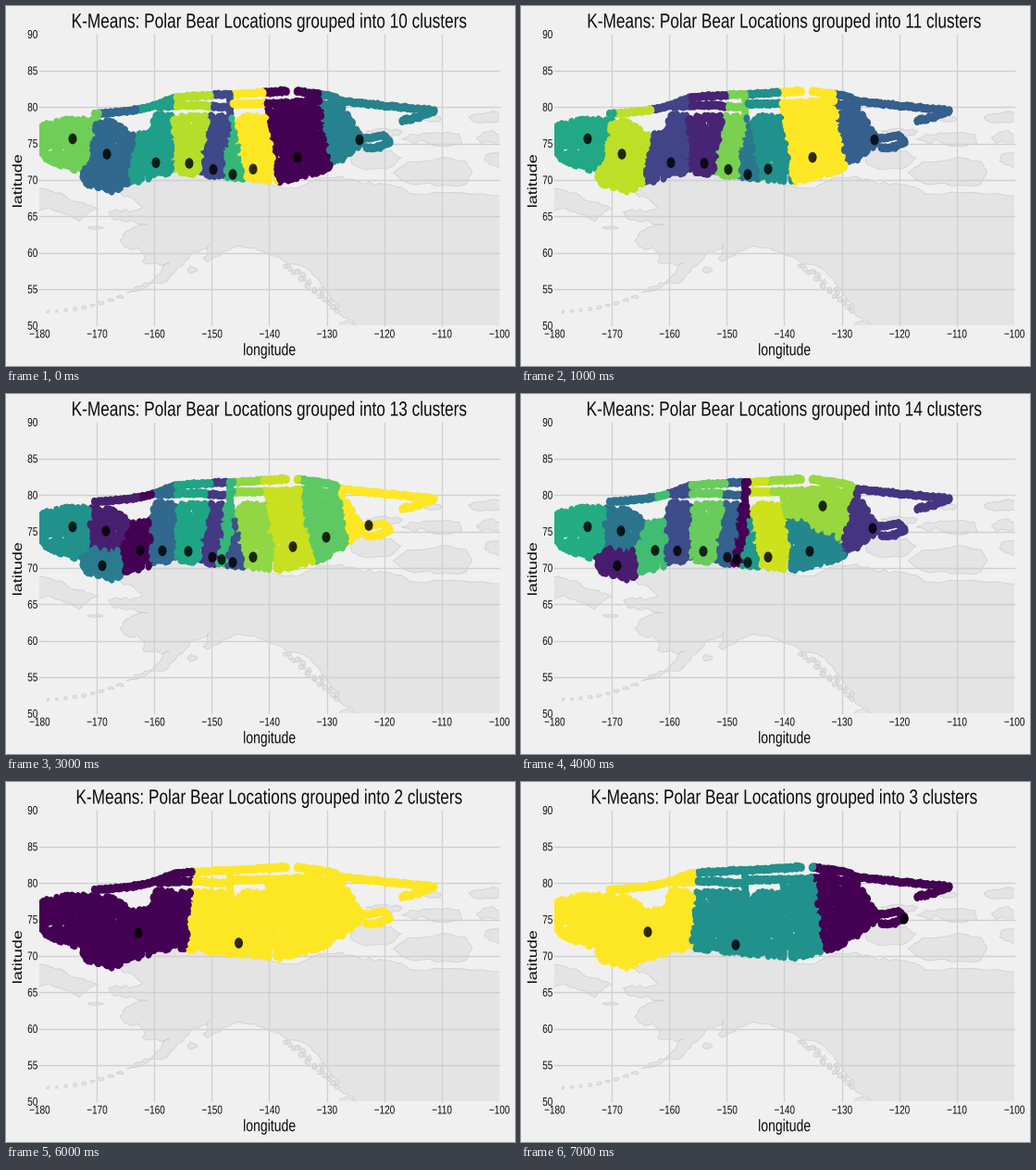
Recreate the animation shown at these times as a matplotlib script. Size 550 by 389 pixels, loop 8000 ms.

```python
import matplotlib.pyplot as plt
import numpy as np
from matplotlib.animation import FuncAnimation
from matplotlib.collections import EllipseCollection
from matplotlib.patches import PathPatch, Polygon, Rectangle
from matplotlib.textpath import TextPath
from matplotlib.transforms import Affine2D

W, H, DPI = 550, 389, 100
LEFT, TOP, PX_LON, PX_LAT = 36, 30.5, 6.21, 7.87
SQUEEZE = 0.78          # horizontal pixel aspect of the whole chart
rng = np.random.default_rng(4)

fig = plt.figure(figsize=(W / DPI, H / DPI), dpi=DPI, facecolor="#f0f0f0")
ax = fig.add_axes([0, 0, 1, 1])
ax.set(xlim=(0, W), ylim=(H, 0))
ax.axis("off")
frame = Rectangle((LEFT, TOP), 80 * PX_LON, 40 * PX_LAT, transform=ax.transData)


def px(lon):
    return LEFT + (lon + 180) * PX_LON


def py(lat):
    return TOP + (90 - lat) * PX_LAT


# ---- text ----
def text_path(s, x, y, size, align=0.5, turn=0):
    path = TextPath((0, 0), s, size=size, prop="Liberation Sans")
    path = path.transformed(Affine2D().rotate_deg(turn).scale(SQUEEZE, -1))
    box = path.get_extents()
    if turn:
        return path.transformed(Affine2D().translate(x, y - (box.y0 + box.y1) / 2))
    return path.transformed(Affine2D().translate(x - box.x0 - align * box.width, y))


def label(*args, **kw):
    return ax.add_patch(PathPatch(text_path(*args, **kw), fc="#0c0c0c", lw=0, zorder=9))


# ---- land, in degrees ----
def land(pts, rounds=3, amount=0.1):
    """Closed coast, roughened by seeded midpoint displacement."""
    lon, lat = np.array(pts, float).T
    pts = np.column_stack([px(lon), py(lat)])
    for _ in range(rounds):
        step = np.roll(pts, -1, axis=0) - pts
        side = np.column_stack([-step[:, 1], step[:, 0]])
        size = np.hypot(*step.T)[:, None]
        bend = rng.normal(0, amount, size.shape) * np.minimum(1, 14 / (size + 1e-9))
        pts = np.stack([pts, pts + step / 2 + side * bend], axis=1).reshape(-1, 2)
    patch = Polygon(pts, fc="#e4e4e4", ec="#d0d0d0", lw=0.6, zorder=1)
    ax.add_patch(patch).set_clip_path(frame)


def isle(lon, lat, w, h, corners=8):
    a = np.arange(corners) * 2 * np.pi / corners
    r = rng.uniform(0.7, 1.1, corners)
    land(np.column_stack([lon + w * r * np.cos(a), lat + h * r * np.sin(a)]), rounds=2)


mainland = [
    (-166.2, 68.3), (-161.9, 70.2), (-156.6, 71.3), (-141, 69.6), (-136, 68.9),
    (-128, 70.4), (-124.5, 69.8), (-117, 69), (-115, 68.1), (-99, 67.8), (-99, 49),
    (-124, 49), (-128, 52), (-130.5, 55.3), (-133.8, 58), (-139.5, 59.6),
    (-146, 60.8), (-151.5, 59.2), (-150.5, 61.2), (-154, 59.2), (-159, 55.8),
    (-164.8, 54.5), (-160.5, 56), (-157.4, 58.6), (-162, 58.7), (-162, 60),
    (-166, 61.6), (-164.8, 63), (-161, 63.8), (-166, 64.5), (-168, 65.6),
    (-162, 66.2), (-164, 67.6)]
siberia = [(-181, 69.1), (-175, 67.4), (-169.8, 66.1), (-173, 64.3),
           (-176, 65.4), (-178.3, 66.2), (-181, 65.1)]
land(mainland, amount=0.12)
land(siberia)
for spot in [(-121.5, 73, 4.2, 1.6), (-111, 71, 7.5, 2.2), (-111, 75.6, 6, 1),
             (-120, 76.6, 3.5, 0.6), (-100, 72.7, 2.5, 1.3), (-101, 75.8, 3, 1),
             (-101, 78.6, 4, 0.9), (-111.5, 78.4, 2, 0.4), (-153.4, 57.6, 1, 0.5),
             (-170.3, 63.4, 1.3, 0.25), (-126.5, 49.9, 1.6, 0.8)]:
    isle(*spot)
# fjord islets in the south-east, then the south-west island arc
for t in np.linspace(0, 1, 26):
    isle(*(np.array([-136.5 + 8.3 * t, 58.2 - 6.2 * t]) + rng.normal(0, 0.3, 2)),
         0.45, 0.4, corners=5)
for t in np.linspace(0, 1, 9):
    isle(-166 - 12.5 * t, 53.9 - 3.6 * t + 1.6 * t * t, 0.7 - 0.45 * t, 0.25, corners=5)

# ---- grid, tick labels, axis titles ----
for lon in range(-180, -99, 10):
    if -180 < lon < -100:
        ax.plot([px(lon)] * 2, [py(90), py(50)], color="#cfcfcf", lw=0.9, zorder=2)
    label(f"\u2212{-lon}", px(lon) + 0.4, 358.5, 12.8)
for lat in range(50, 91, 5):
    if 50 < lat < 90:
        ax.plot([px(-180), px(-100)], [py(lat)] * 2, color="#cfcfcf", lw=1, zorder=2)
    label(str(lat), 33.9, py(lat) + 4.4, 12.8, align=1)
label("longitude", 284.8, 377.3, 18)
label("latitude", 17, 189, 18, turn=90)
title = label("K", 284.7, 23.5, 22)

# ---- sightings, in pixels ----
north = [(35, 130), (60, 123), (98, 122), (120, 126), (133, 138), (153, 138),
         (159, 116), (185, 119), (285, 119), (290, 110), (361, 104), (385, 143)]
south = [(35, 163), (80, 180), (85, 192), (117, 201), (130, 193), (181, 179),
         (235, 185), (297, 190), (350, 177), (385, 150)]
tracks = [
    [(96, 117), (137, 113), (160, 108), (182, 99), (214, 97), (304, 92)],
    [(314, 92), (345, 96), (357, 99)],
    [(165, 109), (205, 107), (240, 110)],
    [(242, 98), (242, 118)],
    [(284, 106), (284, 118)],
    [(242, 106), (300, 105), (340, 102)],
    [(360, 102), (400, 107), (464, 113), (440, 122), (427, 124)],
    [(384, 144), (408, 140), (415, 147), (402, 153), (388, 153)]]


def edge(keys, x):
    return np.interp(x, *np.transpose(keys))


def body(n):
    x, y = rng.uniform((35, 98), (386, 204), (n, 2)).T
    inside = (y > edge(north, x)) & (y < edge(south, x))
    return np.column_stack([x, y])[inside]


def walk(keys):
    """Dots every 1.5 px along a path, slightly scattered."""
    x, y = np.array(keys, float).T
    run = np.r_[0, np.cumsum(np.hypot(np.diff(x), np.diff(y)))]
    s = np.arange(0, run[-1], 1.5)
    line = np.column_stack([np.interp(s, run, x), np.interp(s, run, y)])
    return line + rng.normal(0, 0.5, line.shape)


bears = np.vstack([body(5000)] + [walk(t) for t in tracks])
rng.shuffle(bears)


def ovals(offsets, height, **kw):
    n = len(offsets)
    dots = EllipseCollection(
        np.full(n, height * SQUEEZE), np.full(n, height), np.zeros(n), units="xy",
        offsets=offsets, offset_transform=ax.transData, lw=0, **kw)
    ax.add_collection(dots, autolim=False)
    return dots


dots = ovals(bears, 9, zorder=4)
dots.set_clip_path(frame)
marks = ovals(np.zeros((15, 2)), 11.6, fc="black", alpha=0.82, zorder=5)

# ---- clusters: centres sit on one curve, some split north and south ----
spine = [(72, 143.5), (109, 160), (145, 169), (198, 170), (245, 182), (310, 165),
         (391, 142)]
coarse = [72, 109, 162, 198, 224, 245, 267, 315, 382]
fine = [72, 108, 145, 169, 197, 223, 233, 245, 267, 310]
splits = {108: (13, [(108, 148), (104, 185.5)]),
          310: (14, [(326, 121), (312, 170)]),
          197: (15, [(191, 154), (199, 174)])}
few = {2: [(143, 163), (251.5, 174)], 3: [(137, 162), (232, 176), (414, 148)]}
shades = {2: [0, 1], 3: [2, 1, 0],
          10: [7, 3, 5, 8, 2, 6, 9, 0, 4],
          12: [3, 7, 9, 5, 1, 8, 2, 4, 11, 10, 0, 6],
          14: [8, 5, 1, 9, 3, 10, 4, 0, 7, 12, 11, 6, 2],
          15: [5, 14, 9, 0, 6, 10, 4, 2, 12, 7, 11, 13, 1, 8]}


def centres(k):
    if k in few:
        return np.array(few[k])
    if k < 12:
        xs = coarse
    else:
        xs = fine + ([346, 392] if k < 14 else [380])
    spots = []
    for x in xs:
        since, parts = splits.get(x, (99, None))
        spots += parts if k >= since else [(x, edge(spine, x))]
    return np.array(spots)


def shade(k, n):
    order = shades.get(k, np.random.default_rng(k).permutation(k)[:n])
    return plt.cm.viridis(np.array(order) / (k - 1))


counts = [10, 11, 12, 13, 14, 15, 2, 3]


def draw(i):
    k = counts[i]
    mid = centres(k)
    gap = (bears[:, None] - mid) / (PX_LON, PX_LAT)
    nearest = np.hypot(gap[..., 0], gap[..., 1]).argmin(axis=1)
    dots.set_facecolor(shade(k, len(mid))[nearest])
    marks.set_offsets(np.vstack([mid, np.full((15 - len(mid), 2), -50.0)]))
    title.set_path(text_path(
        f"K-Means: Polar Bear Locations grouped into {k} clusters", 284.7, 23.5, 22.1))
    return dots, marks, title


anim = FuncAnimation(fig, draw, frames=len(counts), interval=1000,
                     init_func=lambda: draw(0), repeat=True, repeat_delay=0)
plt.show()
```
